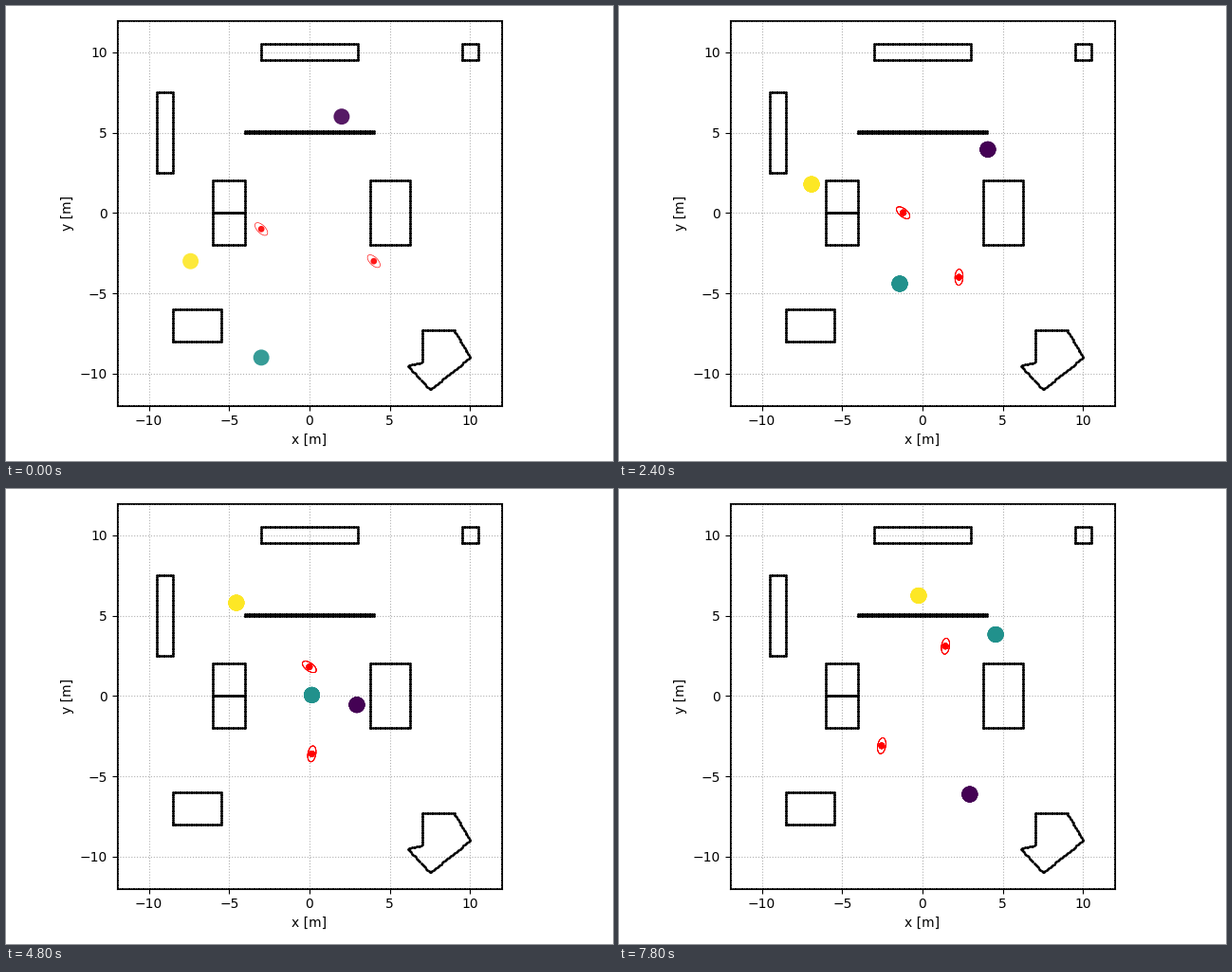
These frames come from a looping animation (640 px wide and 480 px high, 8 s). A matplotlib script:

```python
import numpy as np
import matplotlib.pyplot as plt
from matplotlib.animation import FuncAnimation
from matplotlib.patches import Circle, Ellipse

W, H, DPI = 640, 480, 100
FRAMES, INTERVAL = 40, 200
LAYERS = 6   # translucent bodies pile up over the first few frames
BRAKE = 30   # step at which everyone starts to slow down

fig, ax = plt.subplots(figsize=(W / DPI, H / DPI), dpi=DPI)
ax.set_aspect("equal")
ax.set(xlim=(-12, 12), ylim=(-12, 12), xlabel="x [m]", ylabel="y [m]")
ticks = range(-10, 11, 5)
ax.set_xticks(ticks)
ax.set_yticks(ticks)
ax.grid(linestyle=":")
fig.tight_layout()


def arc(points):
    """Distance along a polyline at each of its points."""
    steps = np.hypot(*np.diff(points, axis=0).T)
    return np.concatenate([[0], np.cumsum(steps)])


def along(points, s):
    """Points on a polyline at the distances s."""
    xs, ys = np.transpose(points)
    d = arc(points)
    return np.interp(s, d, xs), np.interp(s, d, ys)


def wall(points, gap=0.1):
    points = points + points[:1]
    s = np.arange(0, arc(points)[-1] + gap / 2, gap)
    ax.plot(*along(points, s), "k.", ms=2)


def box(x, y, w, h):
    wall([(x, y), (x + w, y), (x + w, y + h), (x, y + h)])


box(-12, -12, 24, 24)
box(-3, 9.5, 6, 1)
box(9.5, 9.5, 1, 1)
box(-9.5, 2.5, 1, 5)
box(-4, 5, 8, 0.1)
box(-6, 0, 2, 2)
box(-6, -2, 2, 2)
box(3.75, -2, 2.5, 4)
box(-8.5, -8, 3, 2)
wall([(7, -7.3), (9, -7.3), (10, -9), (7.5, -11), (6.1, -9.5), (7, -9.3)])


def travel(points, speed):
    """Cruise along the waypoints, then brake so as to end on the last one."""
    t = np.arange(FRAMES)
    last = FRAMES - 1
    u = np.clip((t - BRAKE) / (last - BRAKE), 0, 1)
    left = arc(points)[-1] - speed * last
    return np.column_stack(along(points, speed * t + left * u ** 2))


def stack(make, **style):
    return [ax.add_patch(make(alpha=0.9, zorder=3, **style))
            for _ in range(LAYERS)]


def disc(radius, color):
    return stack(lambda **kw: Circle((0, 0), radius, **kw), fc=color, ec="none")


def ring():
    return stack(lambda **kw: Ellipse((0, 0), 0.5, 1, **kw),
                 fill=False, ec="red", lw=0.5)


# colour, speed in metres per step, waypoints
robots = [
    ("#440154", 0.4, [(2, 6), (4.6, 5.93), (4.8, 5.7), (4.05, 3.92),
                      (2.95, 2), (2.94, -6.12)]),
    ("#21918c", 0.425, [(-3, -9), (-1.43, -6.8), (-1.4, -1.5), (2.24, 2.17),
                        (4.55, 3.83)]),
    ("#fde725", 0.402, [(-7.4, -3), (-6.92, 0), (-6.9, 2), (-5.75, 4.87),
                        (-4.46, 5.87), (-1.77, 5.87), (-0.24, 6.25)]),
]
# waypoints, then the steps and headings (degrees) between which they turn
walkers = [
    ([(-3, -1), (-1.8, -0.68), (-1, 0.25), (0.02, 1.86), (0.7, 2.87),
      (1.43, 3.1)], [0, 7, 14, 31, 39], [45, 33, 58, 52, -8]),
    ([(4, -3), (3.2, -3.93), (2.28, -4), (-2.54, -3.1)],
     [0, 7, 12, 18], [225, 205, 178, 170]),
]

bodies = [(disc(0.5, color), travel(points, speed), np.zeros(FRAMES))
          for color, speed, points in robots]
for points, steps, headings in walkers:
    path = travel(points, 0.18)
    turn = np.interp(np.arange(FRAMES), steps, headings)
    bodies += [(disc(0.2, "red"), path, turn), (ring(), path, turn)]


def update(step):
    for layers, path, turn in bodies:
        for k, patch in enumerate(layers):
            patch.set_visible(k <= step)
            patch.set_center(path[step])
            if isinstance(patch, Ellipse):
                patch.set_angle(turn[step])
    return [patch for layers, *_ in bodies for patch in layers]


anim = FuncAnimation(fig, update, frames=FRAMES, interval=INTERVAL,
                     repeat=True, repeat_delay=0)
plt.show()
```
